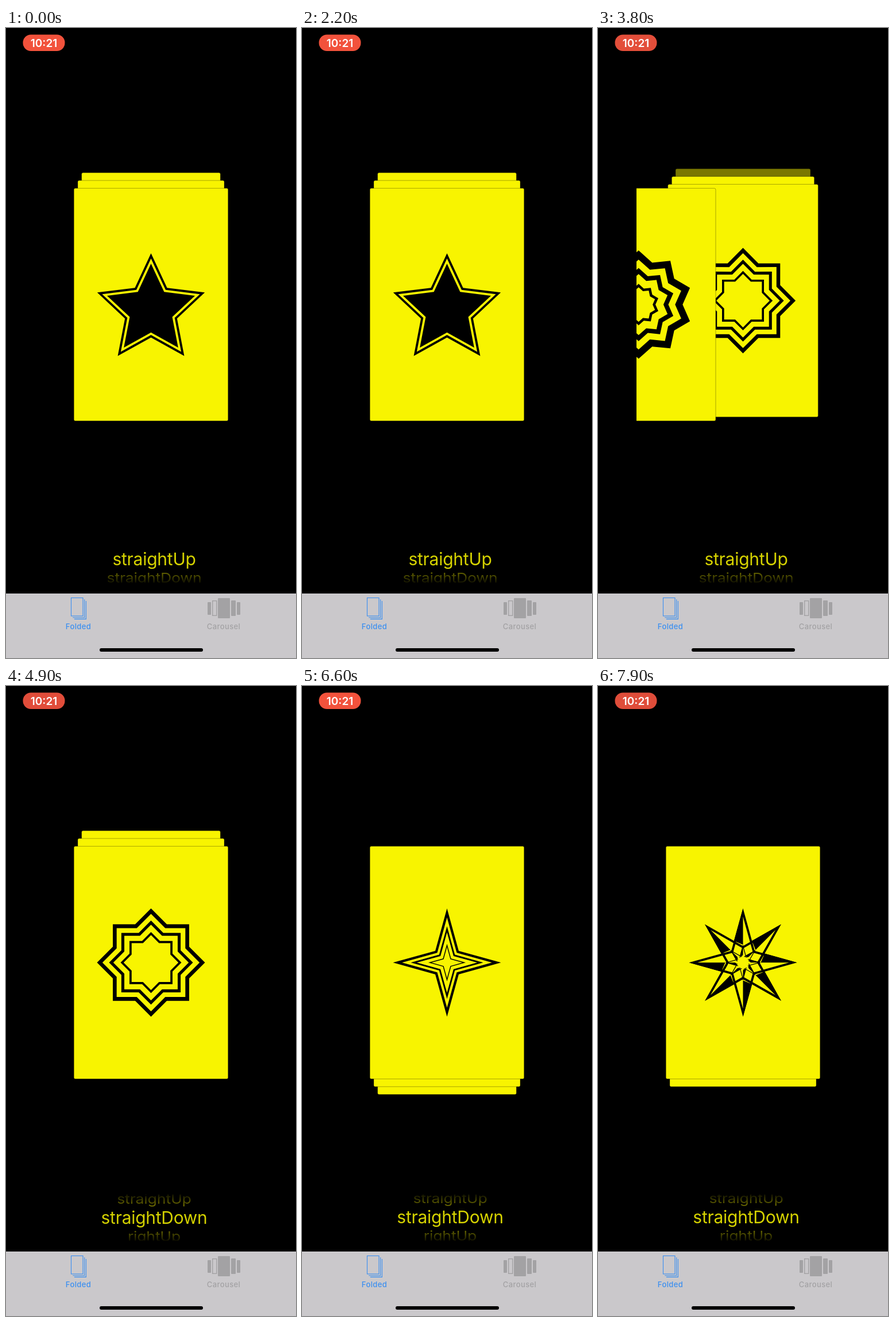
An HTML page with a canvas for the animation above (8000 ms loop, 505 px wide and 1094 px high).

```html
<!DOCTYPE html>
<html>
<head>
<meta charset="utf-8">
<style>
  html, body { margin: 0; width: 100%; height: 100%; overflow: hidden; background: #000; }
  canvas { display: block; }
</style>
</head>
<body>
<canvas id="stage" width="505" height="1094"></canvas>
<script>
const ctx = document.getElementById('stage').getContext('2d');
const LOOP = 8000, YELLOW = '#f8f400', BLACK = '#000';
const CENTER_X = 252.5, CARD_W = 268.5, CARD_H = 404, CARD_TOP = 278.3, PAGE = 371, LAST_CARD = 5;
const SWIPES = [2340, 3497, 5500, 6600], PICK_START = 4250, MOVE = 800;
const OPTIONS = ['straightUp', 'straightDown', 'rightUp'];

const clamp = (v, lo = 0, hi = 1) => Math.min(hi, Math.max(lo, v));
const move = (t, start) => {
  const u = clamp((t - start) / MOVE);
  return 1 - (1 - u) ** 3 * (1 + 3 * u);
};

function fillBox(x, y, w, h, r, color) {
  ctx.fillStyle = color;
  ctx.beginPath();
  ctx.roundRect(x, y, w, h, r);
  ctx.fill();
}

function label(text, x, y, font, color, spacing = 0) {
  ctx.font = font + ' Inter, sans-serif';
  ctx.letterSpacing = spacing + 'px';
  ctx.textAlign = 'center';
  ctx.fillStyle = color;
  ctx.fillText(text, x, y);
}

// Stars are drawn around the current origin.
function starPath(points, radius, dent, cy = 0) {
  for (let i = 0; i < points * 2; i++) {
    const a = i * Math.PI / points, r = i % 2 ? radius * dent : radius;
    ctx[i ? 'lineTo' : 'moveTo'](r * Math.sin(a), cy - r * Math.cos(a));
  }
  ctx.closePath();
}

// Alternating radii cut each other out, leaving bands.
function bands(points, dent, radii, cy = 0) {
  ctx.fillStyle = BLACK;
  ctx.beginPath();
  radii.forEach(r => starPath(points, r, dent, cy));
  ctx.fill('evenodd');
}

// Two crossed four-pointed outlines with one half of every ray filled.
function compass(R) {
  for (let i = 0; i < 8; i++) {
    ctx.save();
    ctx.rotate(i * Math.PI / 4);
    if (i < 2) bands(4, 0.307, [R, R * 0.85]);
    ctx.fillStyle = BLACK;
    ctx.beginPath();
    ctx.moveTo(0, -R);
    ctx.lineTo(-R * 0.167, -R * 0.402);
    ctx.lineTo(0, -R * 0.33);
    ctx.fill();
    ctx.restore();
  }
}

const EMBLEMS = [
  () => bands(5, 0.484, [98.5, 89.5, 80.5], 9.5),
  () => bands(10, 0.815, [94, 78, 63.5, 53, 36, 30]),
  () => bands(8, 0.765, [94, 84.6, 73, 65.7, 53, 47.7]),
  () => bands(4, 0.307, [94, 78.3, 63, 52.5, 32.5, 27]),
  () => {
    compass(94);
    compass(31);
    ctx.fillStyle = YELLOW;
    ctx.beginPath();
    starPath(8, 14, 0.62);
    ctx.fill();
  }
];

// slot: 0 is the front place, positive lies behind, negative has been swiped away
function drawCard(index, slot, direction) {
  const depth = Math.max(slot, 0), scale = 1 - 0.05 * depth, w = CARD_W * scale;
  ctx.save();
  ctx.globalAlpha = clamp(3 - slot);
  ctx.translate(CENTER_X + Math.min(slot, 0) * PAGE, CARD_TOP + CARD_H / 2 + direction * 13.5 * depth);
  fillBox(-w / 2, -CARD_H / 2, w, CARD_H, 2.5, YELLOW);
  ctx.strokeStyle = 'rgba(0,0,0,.4)';
  ctx.lineWidth = 0.8;
  ctx.stroke();
  ctx.scale(scale, scale);
  if (EMBLEMS[index]) EMBLEMS[index]();
  ctx.restore();
}

function drawStack(t) {
  const position = SWIPES.reduce((sum, start) => sum + move(t, start), 0);
  const direction = t < PICK_START + MOVE ? -1 : 1;
  ctx.save();
  ctx.beginPath();
  ctx.rect(67, 200, PAGE, 560);
  ctx.clip();
  for (let i = LAST_CARD; i >= 0; i--) {
    const slot = i - position;
    if (slot > -1 && slot < 3) drawCard(i, slot, direction);
  }
  ctx.restore();
}

function fade(y0, y1) {
  const g = ctx.createLinearGradient(0, y0, 0, y1);
  g.addColorStop(0, 'rgba(0,0,0,0)');
  g.addColorStop(1, '#000');
  ctx.fillStyle = g;
  ctx.fillRect(0, Math.min(y0, y1), 505, Math.abs(y1 - y0));
}

function drawPicker(t) {
  const selected = move(t, PICK_START);
  ctx.save();
  ctx.beginPath();
  ctx.rect(0, 883, 505, 80);
  ctx.clip();
  OPTIONS.forEach((text, i) => {
    const d = i - selected, far = Math.abs(d);
    if (far > 1.6) return;
    ctx.save();
    ctx.translate(258, 922 + 32.5 * d);
    ctx.scale(1 - 0.11 * far, 1 - 0.22 * far * far);
    ctx.globalAlpha = clamp(1 - 0.47 * far);
    label(text, 0, 11.3, '400 30px', '#d6d300', -0.25);
    ctx.restore();
  });
  fade(904, 879);
  fade(943, 967);
  ctx.restore();
}

function drawStatus(t) {
  const glow = ((1 + Math.cos((t - 2100) / 2200 * 2 * Math.PI)) / 2) ** 3;
  const mix = (a, b) => Math.round(a + (b - a) * glow);
  fillBox(29.5, 11.5, 73, 28.5, 14, `rgb(${mix(223, 243)},${mix(77, 82)},${mix(58, 60)})`);
  label('10:21', 66, 32.5, '600 19px', '#fff');
}

function drawTabs() {
  const blue = '#3b8ff0', grey = '#a3a2a4';
  ctx.fillStyle = '#cac8cb';
  ctx.fillRect(0, 982, 505, 112);

  ctx.strokeStyle = blue;
  ctx.lineWidth = 1.1;
  ctx.strokeRect(113.5, 989.5, 20.5, 31.5);
  ctx.beginPath();
  for (const d of [2.7, 5.4]) {
    ctx.moveTo(113.5 + d, 1021 + d);
    ctx.lineTo(134 + d, 1021 + d);
    ctx.lineTo(134 + d, 989.5 + d);
  }
  ctx.stroke();
  label('Folded', 126, 1043.5, '500 13px', blue, 0.4);

  fillBox(351, 997, 6, 22, 1, grey);
  fillBox(369, 990, 21, 35, 1, grey);
  fillBox(392, 994, 8, 27, 1, grey);
  fillBox(402, 997, 6, 22, 1, grey);
  ctx.strokeStyle = grey;
  ctx.lineWidth = 1.4;
  ctx.strokeRect(359.7, 994.7, 7, 25.6);
  label('Carousel', 379, 1043.5, '500 13px', grey, 0.4);

  fillBox(163, 1077, 180, 6, 3, BLACK);
}

function frame(now) {
  const t = now % LOOP;
  ctx.fillStyle = BLACK;
  ctx.fillRect(0, 0, 505, 1094);
  drawStack(t);
  drawPicker(t);
  drawStatus(t);
  drawTabs();
  requestAnimationFrame(frame);
}
requestAnimationFrame(frame);
</script>
</body>
</html>
```
